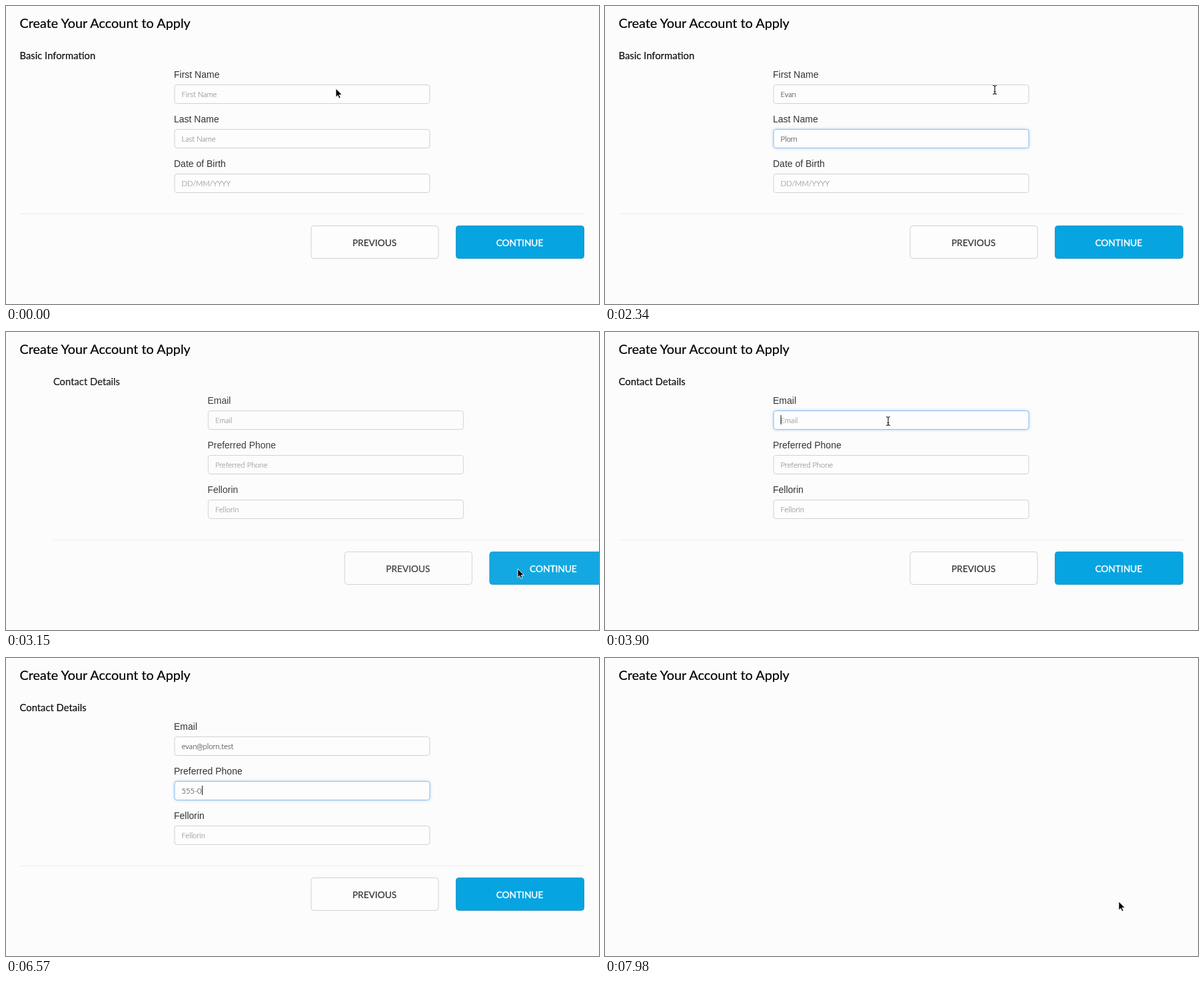
Animation, 890 px wide and 448 px high, one loop 8000 ms. Source, as an HTML page:

```html
<!DOCTYPE html>
<html lang="en">
<head>
<meta charset="utf-8">
<title>Create Your Account</title>
<style>
  html, body { margin: 0; width: 100%; height: 100%; overflow: hidden; background: #fcfcfd; }
  svg { display: block; }
  text { font-family: Lato, sans-serif; fill: #111; stroke: #111; stroke-width: .2px; white-space: pre; }
  .title { font-size: 19.85px; fill: #000; stroke: #000; }
  .heading { font-size: 14.8px; }
  .label { font: 14px "Liberation Sans", Arial, sans-serif; fill: #333; stroke: none; }
  .value { font-size: 11.2px; font-weight: 300; fill: #444; stroke: #444; stroke-width: .15px; }
  .value.empty { fill: #8e8e8e; stroke: #8e8e8e; }
  .button { font-size: 13.7px; text-anchor: middle; fill: #333; stroke: #333; }
  .primary { fill: #fff; stroke: #fff; stroke-width: .4px; }
  .box { fill: #fdfdfe; stroke: #d0d0d8; }
  .box.focus { stroke: #8fbcee; filter: drop-shadow(0 0 2px rgba(102, 175, 233, .5)); }
  .caret { fill: #111; }
</style>
</head>
<body>
<svg id="stage" width="890" height="448" viewBox="0 0 890 448">
  <text class="title" x="20.5" y="33">Create Your Account to Apply</text>
  <g id="pages"></g>
  <g id="pointer">
    <path id="arrow" d="M0 0V13.2L3 10.4 5 15 7.2 14 5.2 9.6H9.4Z" fill="#000" stroke="#fff" stroke-width=".9"/>
    <path id="beam" d="M-3 -6.5Q0 -6.5 0 -4.5Q0 -6.5 3 -6.5M0 -4.5V4.5M-3 6.5Q0 6.5 0 4.5Q0 6.5 3 6.5M-1.5 2.5H1.5" fill="none" stroke="#222" stroke-width="1.2"/>
  </g>
</svg>
<script>
const LOOP = 8000, BLINK = 530, TEXT_X = 263.5;
const $ = id => document.getElementById(id);

// Typing starts at `start`, one character every `gap` ms, while focused from `focus` to `blur`.
const pages = [
  { heading: 'Basic Information', leave: 2640, gone: 2790, fields: [
    { label: 'First Name', typing: { text: 'Evan', focus: 200, blur: 1050, start: 450, gap: 120 } },
    { label: 'Last Name', typing: { text: 'Plorn', focus: 1050, blur: 2640, start: 1250, gap: 110 } },
    { label: 'Date of Birth', hint: 'DD/MM/YYYY' } ] },
  { heading: 'Contact Details', enter: 2798, leave: 7800, gone: 7950, fields: [
    { label: 'Email', typing: { text: 'evan@plorn.test', focus: 3780, blur: 5650, start: 4100, gap: 75 } },
    { label: 'Preferred Phone', typing: { text: '555-0142', focus: 5650, blur: 7800, start: 6050, gap: 120 } },
    { label: 'Fellorin' } ] }
];

// time, x, y
const track = [
  [0, 495, 124], [200, 497, 131], [2200, 497, 131], [2340, 585, 126],
  [2580, 770, 364], [2790, 771, 370], [2970, 770, 359], [3150, 768, 356],
  [3650, 425, 134], [7250, 425, 134], [7680, 771, 366], [LOOP, 771, 366]
];
const hidden = [[450, 2180], [4100, 7250]];

const clamp = (v, lo = 0, hi = 1) => Math.min(hi, Math.max(lo, v));
const show = (node, on) => node.setAttribute('visibility', on ? 'inherit' : 'hidden');

function add(parent, tag, attrs, text = '') {
  const node = document.createElementNS('http://www.w3.org/2000/svg', tag);
  for (const key in attrs) node.setAttribute(key, attrs[key]);
  node.textContent = text;
  return parent.appendChild(node);
}

// Standard "ease": cubic-bezier(.25, .1, .25, 1)
function ease(x) {
  const bezier = (a, b, s) => 3 * a * s * (1 - s) ** 2 + 3 * b * s * s * (1 - s) + s ** 3;
  let lo = 0, hi = 1;
  for (let i = 0; i < 24; i++) {
    const mid = (lo + hi) / 2;
    if (bezier(.25, .25, mid) < x) lo = mid; else hi = mid;
  }
  return x >= 1 ? 1 : bezier(.1, 1, lo);
}

function buildPage(page) {
  const g = page.node = add($('pages'), 'g', {});
  add(g, 'text', { class: 'heading', x: 20.5, y: 80 }, page.heading);
  page.fields.forEach((field, i) => {
    const y = 118 + 67 * i;
    field.hint = field.hint || field.label;
    add(g, 'text', { class: 'label', x: 252, y: y - 10 }, field.label);
    field.box = add(g, 'rect', { class: 'box', x: 253, y: y + .5, width: 383, height: 28, rx: 3.5 });
    field.value = add(g, 'text', { class: 'value empty', x: TEXT_X, y: y + 19 }, field.hint);
    field.caret = add(g, 'rect', { class: 'caret', y: y + 7, width: 1, height: 14, visibility: 'hidden' });
  });
  add(g, 'path', { d: 'M21 312.5H868', stroke: '#efefe0' });
  add(g, 'rect', { class: 'box', x: 458, y: 330.5, width: 191, height: 49, rx: 4 });
  add(g, 'text', { class: 'button', x: 553, y: 360.5 }, 'PREVIOUS');
  add(g, 'rect', { x: 675.5, y: 330.5, width: 192, height: 49, rx: 4, fill: '#06a4e0', stroke: '#2b98c4' });
  add(g, 'text', { class: 'button primary', x: 771, y: 360.5 }, 'CONTINUE');
}

function drawField(field, t) {
  const k = field.typing;
  if (!k) return;
  const count = clamp(Math.floor((t - k.start) / k.gap) + 1, 0, k.text.length);
  const focused = t >= k.focus && t < k.blur;
  const lastKey = count ? k.start + (count - 1) * k.gap : k.focus;
  field.value.textContent = count ? k.text.slice(0, count) : field.hint;
  field.value.classList.toggle('empty', !count);
  field.box.classList.toggle('focus', focused);
  show(field.caret, focused && (t - lastKey) % (2 * BLINK) < BLINK);
  field.caret.setAttribute('x', TEXT_X + (count ? field.value.getComputedTextLength() + .5 : 0));
}

function drawPage(page, t) {
  const active = t >= (page.enter || 0) && t < page.gone;
  show(page.node, active);
  if (!active) return;
  const entered = page.enter ? ease(clamp((t - page.enter) / 500)) : 1;
  const left = clamp((t - page.leave) / (page.gone - page.leave));
  page.node.setAttribute('transform', `translate(${890 * (1 - entered)} 0)`);
  page.node.setAttribute('opacity', entered * (1 - left));
  page.fields.forEach(field => drawField(field, t));
}

function drawPointer(t) {
  const i = track.findIndex(key => key[0] > t);
  const [t0, x0, y0] = track[i - 1], [t1, x1, y1] = track[i];
  const p = (t - t0) / (t1 - t0), s = p * p * (3 - 2 * p);
  const x = x0 + (x1 - x0) * s, y = y0 + (y1 - y0) * s;
  const overField = t > 60 && x > 253 && x < 636 && y > 118 && y < 281 && (y - 118) % 67 < 29;
  $('pointer').setAttribute('transform', `translate(${x} ${y})`);
  show($('pointer'), !hidden.some(([from, to]) => t >= from && t < to));
  show($('arrow'), !overField);
  show($('beam'), overField);
}

pages.forEach(buildPage);
const begin = performance.now();
function frame() {
  const t = (performance.now() - begin) % LOOP;
  pages.forEach(page => drawPage(page, t));
  drawPointer(t);
  requestAnimationFrame(frame);
}
frame();
</script>
</body>
</html>
```
